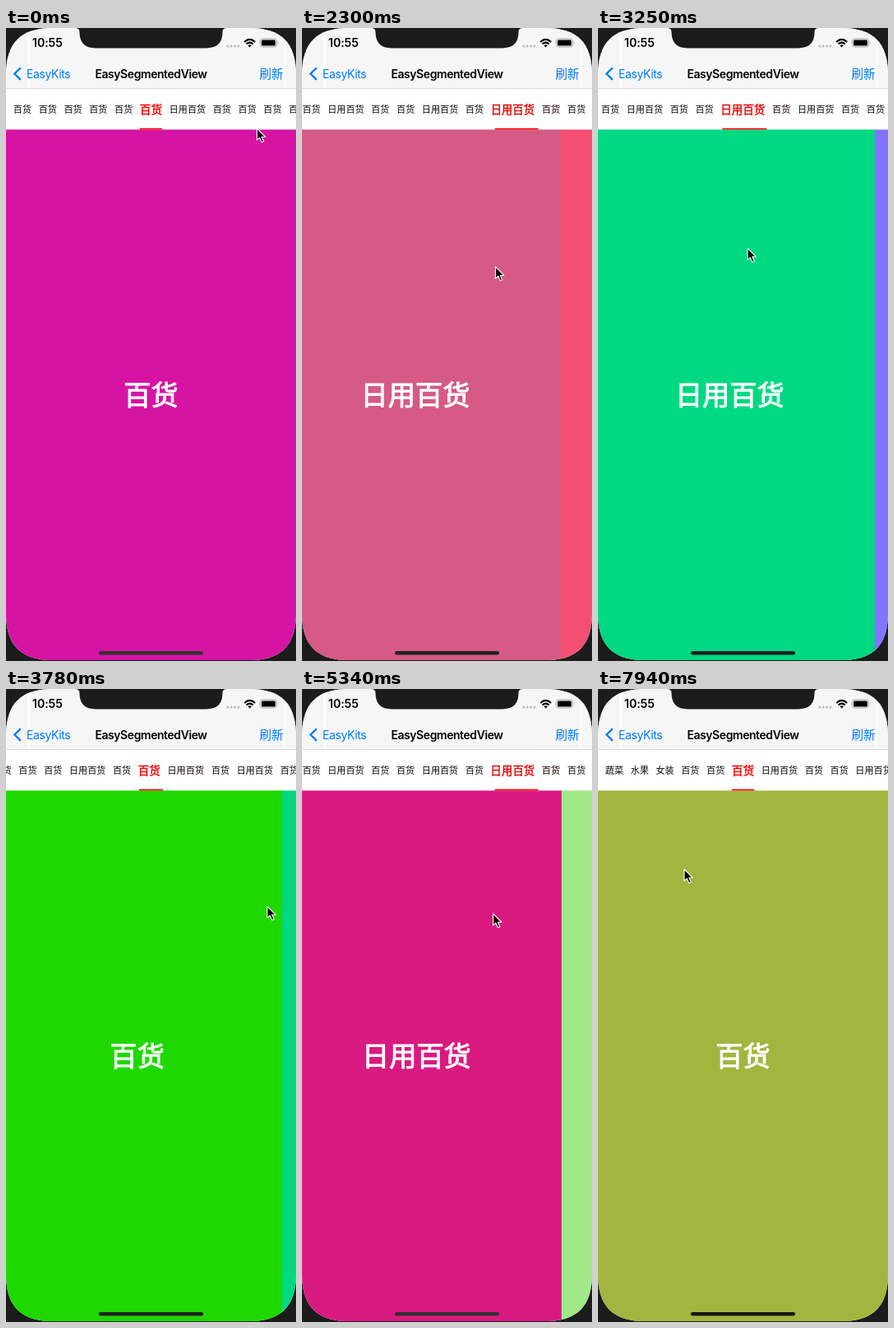
An HTML page for the animation above (8000 ms loop, 353 by 769 pixels).

```html
<!DOCTYPE html>
<html lang="zh">
<head>
<meta charset="utf-8">
<title>EasySegmentedView</title>
<style>
  html, body { margin: 0; width: 100%; height: 100%; overflow: hidden; background: #1c1c1c; }
  svg { display: block; width: 353px; height: 769px; }
  text { font-family: Inter, 'Noto Sans CJK SC', 'Noto Sans CJK', sans-serif; }
  .cjk { font-family: 'Noto Sans CJK SC', 'Noto Sans CJK', sans-serif; }
  .label { font-size: 33.2px; fill: #fff; stroke: #fff; stroke-width: 1; text-anchor: middle; }
  .tab { font-size: 11.1px; }
</style>
</head>
<body>
<svg viewBox="0 0 353 769">
  <defs>
    <clipPath id="screen">
      <path d="M0 57C0 18 18 0 57 0H296C335 0 353 18 353 57V711C353 750 335 768 296 768H57C18 768 0 750 0 711Z"/>
    </clipPath>
  </defs>
  <g clip-path="url(#screen)">
    <rect width="353" height="769" fill="#fff"/>
    <g id="pages"></g>
    <g id="tabs"></g>
    <rect id="line" y="121.7" height="1.7" fill="#f00"/>
    <rect width="353" height="73.3" fill="#f6f6f6"/>
    <rect x="26" width="3" height="73" fill="#fdfdfd"/>
    <rect x="338" width="3" height="73" fill="#fdfdfd"/>
    <rect y="73" width="353" height="1" fill="#dcdcdc"/>

    <text x="32" y="23.4" font-size="14.2" font-weight="600" letter-spacing="-.1">10:55</text>
    <g id="dots" fill="#bdbdbd"></g>
    <g fill="none" stroke="#000" stroke-width="2.1">
      <path d="M290.2 16.9Q296.7 10.8 303.2 16.9"/>
      <path d="M292.6 19.5Q296.7 15.7 300.8 19.5"/>
    </g>
    <path d="M294.5 21.2Q296.7 19.2 298.9 21.2L296.7 23.6Z"/>
    <rect x="309.5" y="13" width="20" height="10" rx="3" fill="none" stroke="#a5a5a5"/>
    <rect x="311" y="14.5" width="17" height="7" rx="1.6"/>
    <path d="M331 16.3Q332.8 18 331 19.7Z" fill="#a5a5a5"/>

    <path d="M17.8 48.3L10.4 55.6L17.8 62.9" fill="none" stroke="#007aff" stroke-width="2.3"/>
    <text x="25" y="60.5" font-size="14" letter-spacing="-.4" fill="#007aff">EasyKits</text>
    <text x="176.5" y="60.5" font-size="14" font-weight="600" letter-spacing="-.43" text-anchor="middle">EasySegmentedView</text>
    <text id="reload" class="cjk" x="308.5" y="60.5" font-size="14.5" fill="#007aff">刷新</text>
    <path d="M84 0Q89.5 0 89.5 5C89.5 18 96 24.4 109 24.4H244C257 24.4 263.5 18 263.5 5Q263.5 0 269 0Z" fill="#1c1c1c"/>
    <rect id="home" x="113" y="757" width="127" height="4.4" rx="2.2"/>
  </g>
  <path id="cursor" d="M0 0V14.2L3.2 11.2L5.7 16.8L8.2 15.7L5.8 10.3H10.3Z" stroke="#fff" stroke-width="1.1" stroke-linejoin="round"/>
</svg>
<script>
const LOOP = 8000, W = 353, MID = 176.5;
const SIZE = 11.1, GROW = .23, GAP = 8.6, LEFT = 9, RIGHT = 345.3;
const SWIPE = 500, JUMP = 370, PRESS = 150, DRAG = 180, TRAVEL = 320;
const HOME = 105, FAR = 318, BUTTON = [323.5, 56];

// S = short tab, L = long tab
const names = ['蔬菜', '水果', '女装',
  ...[...'SSSLSSL' + 'SSSSSSLSSSS' + 'SSSLSSLSLSS'].map(k => k === 'S' ? '百货' : '日用百货')];
const near = names.length - 2;

// Each reload picks a tab; colours run from that tab towards the left.
// The cursor leaves the button at `leave` and drags at height y, rising a little per swipe.
const runs = [
  { at: 0, tab: 15, colors: ['#d614a4'], swipes: [] },
  { at: 1130, tab: near, colors: ['#f24f72', '#d55a85', '#8274ff', '#00d882', '#1ed800'],
    swipes: [2040, 2645, 2930, 3462], leave: 1735, y: 294, rise: 10 },
  { at: 4390, tab: near, colors: ['#a0e888', '#d91a80', '#0013b2'],
    swipes: [5077, 6133], leave: 4600, y: 297, rise: 60 },
  { at: 7080, tab: 5, colors: ['#a2b63f'], swipes: [], leave: 7540, y: 219 }
];

const $ = id => document.getElementById(id);
const lerp = (a, b, k) => a + (b - a) * k;
const clamp = (v, lo, hi) => Math.min(hi, Math.max(lo, v));
const smooth = k => k * k * (3 - 2 * k);
const easeOut = k => Math.sin(k * Math.PI / 2);

function set(el, attrs) {
  for (const key in attrs) el.setAttribute(key, attrs[key]);
}

function make(tag, parent, attrs = {}, text = '') {
  const el = document.createElementNS('http://www.w3.org/2000/svg', tag);
  set(el, attrs);
  el.textContent = text;
  return parent.appendChild(el);
}

for (let i = 0; i < 4; i++) make('circle', $('dots'), { cx: 269.8 + i * 4.4, cy: 22, r: 1.5 });

const tabs = names.map(name => make('text', $('tabs'), { class: 'cjk tab', y: SIZE * .38 }, name));
const pages = [0, 1].map(() => {
  const g = make('g', $('pages'));
  return {
    g,
    fill: make('rect', g, { y: 123.4, width: W + 1, height: 646 }),
    label: make('text', g, { class: 'cjk label', x: MID, y: 457.8 })
  };
});

function buildCursorPath() {
  const path = [[60, 305.5, 122], [60 + TRAVEL, ...BUTTON]];
  runs.forEach(({ swipes, leave, y, rise }, n) => {
    if (n) path.push([leave, ...BUTTON], [Math.min(leave + TRAVEL, swipes[0] ?? LOOP), HOME, y]);
    swipes.forEach((at, k) => {
      const row = y - rise * k, next = swipes[k + 1];
      path.push([at, HOME, row], [at + DRAG, FAR, row]);
      if (next) path.push([Math.min(at + DRAG + TRAVEL, next), HOME, row - rise]);
    });
    if (swipes.length) {
      const arrive = runs[n + 1].at - PRESS - 10;
      path.push([arrive - TRAVEL, FAR, y - rise * (swipes.length - 1)], [arrive, ...BUTTON]);
    }
  });
  return path;
}
const cursorPath = buildCursorPath();

function cursorAt(t) {
  const n = cursorPath.findIndex(p => p[0] > t);
  const b = cursorPath.at(n), a = n > 0 ? cursorPath[n - 1] : b;
  const k = a === b ? 0 : easeOut((t - a[0]) / (b[0] - a[0]));
  return [lerp(a[1], b[1], k), lerp(a[2], b[2], k)];
}

function layout(pos) {
  let x = LEFT;
  return names.map((name, i) => {
    const weight = Math.max(0, 1 - Math.abs(i - pos));
    const scale = 1 + GROW * weight;
    const item = { x, weight, scale, w: name.length * SIZE * scale };
    x += item.w + GAP;
    return item;
  });
}

// Strip offset and indicator when one tab is fully selected
function rest(i) {
  const items = layout(i), end = items.at(-1);
  const mid = items[i].x + items[i].w / 2;
  const offset = clamp(mid - MID, 0, end.x + end.w - RIGHT);
  return { offset, mid: mid - offset, w: items[i].w };
}

function mix(a, b, k) {
  return { offset: lerp(a.offset, b.offset, k), mid: lerp(a.mid, b.mid, k), w: lerp(a.w, b.w, k) };
}

function strip(pos) {
  const i = Math.floor(pos), k = pos - i;
  if (!k) return rest(i);
  const s = mix(rest(i), rest(i + 1), k);
  s.w += 14 * k * (1 - k);
  return s;
}

function position(run, t) {
  return run.tab - run.swipes.reduce((sum, at) => sum + 1 - (1 - clamp((t - at) / SWIPE, 0, 1)) ** 3, 0);
}

// The home bar is lighter over dark pages
function homeColor(hex) {
  const [r, g, b] = [1, 3, 5].map(i => parseInt(hex.slice(i, i + 2), 16));
  const v = Math.max(20, 88 - .4 * (.3 * r + .59 * g + .11 * b));
  return `rgb(${v},${v},${v})`;
}

function draw(t) {
  const n = runs.filter(r => r.at <= t).length - 1;
  const run = runs[n], pos = position(run, t);

  let view = strip(pos);
  if (n && t < run.at + JUMP) {
    view = mix(strip(position(runs[n - 1], run.at)), view, smooth((t - run.at) / JUMP));
  }

  layout(pos).forEach(({ x, weight, scale }, i) => {
    const dark = 17 * (1 - weight), color = `rgb(${lerp(17, 255, weight)},${dark},${dark})`;
    set(tabs[i], {
      transform: `translate(${x - view.offset} 98.5) scale(${scale})`,
      fill: color, stroke: color, 'stroke-width': .05 + .3 * weight
    });
  });
  set($('line'), { x: view.mid - view.w / 2, width: view.w });

  const first = Math.floor(pos);
  pages.forEach((page, k) => {
    const i = first + k, color = run.colors[run.tab - i];
    set(page.g, { visibility: color ? 'visible' : 'hidden', transform: `translate(${(i - pos) * W} 0)` });
    if (color) set(page.fill, { fill: color });
    page.label.textContent = names[i];
  });

  set($('home'), { fill: homeColor(run.colors[run.tab - Math.round(pos)]) });
  const pressed = runs.some(r => t >= r.at - PRESS && t < r.at);
  set($('reload'), { opacity: pressed ? .3 : 1 });
  set($('cursor'), { transform: `translate(${cursorAt(t).join(' ')})` });
}

const start = performance.now();
function frame() {
  draw((performance.now() - start) % LOOP);
  requestAnimationFrame(frame);
}
frame();
</script>
</body>
</html>
```
